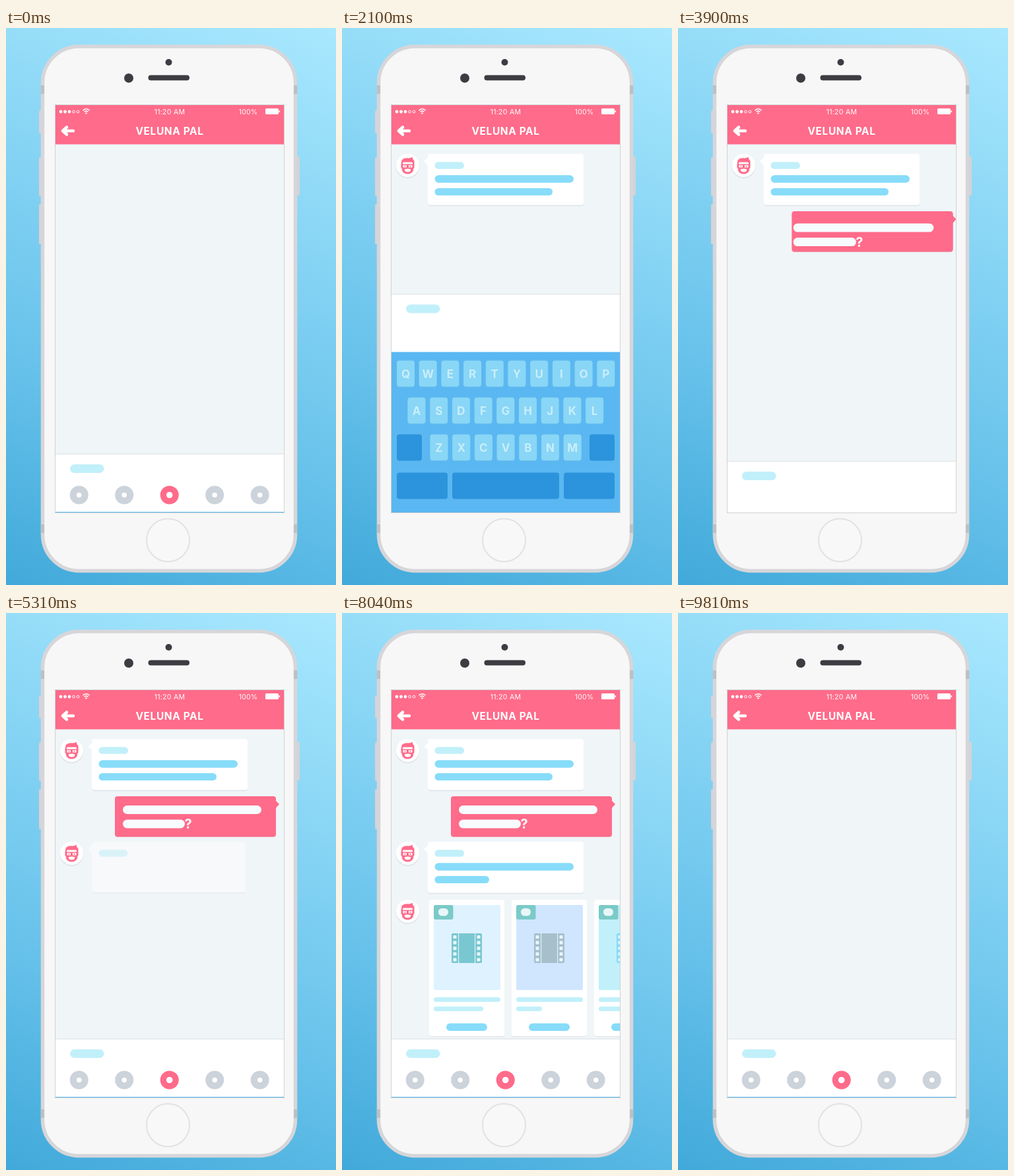
Animation, 500 px wide and 845 px high, one loop 9900 ms. Source, as an HTML page:

```html
<!DOCTYPE html>
<html lang="en">
<head>
<meta charset="utf-8">
<title>Chat assistant</title>
<style>
  html, body { margin: 0; width: 100%; height: 100%; overflow: hidden; }
  body { background: linear-gradient(202deg, #a9e8fe 0%, #7fd0f2 42%, #66c1ea 68%, #41a9da 100%); }
  svg { display: block; width: 500px; height: 845px; }
  text { font-family: Inter, Roboto, sans-serif; text-anchor: middle; }
</style>
</head>
<body>
<svg viewBox="0 0 500 845">
  <defs>
    <clipPath id="screen"><rect x="75" y="117" width="346" height="618"/></clipPath>
    <clipPath id="area"><rect x="75" y="176" width="346" height="559"/></clipPath>
    <g id="face">
      <circle cy="1.5" r="18" fill="#e0e6ea"/>
      <circle r="17.5" fill="#fff"/>
      <g fill="#ff6b8a">
        <path d="M-10 -1L-9 -8Q-5 -12 1 -11Q5 -11 7 -13Q7 -10 10 -7L10 -1H8L7 -5H-7L-8 -1Z"/>
        <path d="M-10 -2H10V4H9L8 9Q5 13 0 13Q-5 13 -8 9L-9 4H-10Z"/>
      </g>
      <path d="M-7 -4H7V-2.5H-7ZM-7 -.5H-1.5V3H-7ZM1.5 -.5H7V3H1.5ZM-5 6Q0 4 5 6L4 9Q0 11 -4 9Z" fill="#fff"/>
      <path d="M-5 .5H-3V2H-5ZM3 .5H5V2H3Z" fill="#ff6b8a"/>
    </g>
  </defs>

  <g fill="#d3d3d8">
    <rect x="50" y="125" width="8" height="35" rx="2"/>
    <rect x="50" y="196" width="8" height="59" rx="2"/>
    <rect x="50" y="267" width="8" height="61" rx="2"/>
    <rect x="437" y="195" width="8" height="59" rx="2"/>
  </g>
  <rect x="55.5" y="28" width="383" height="795.5" rx="55" fill="#f7f7f7" stroke="#d6d6da" stroke-width="5.5"/>
  <path d="M52.7 87H58V100H52.7ZM436 87H441.3V100H436ZM52.7 753H58V766H52.7ZM436 753H441.3V766H436Z" fill="#bfbfc3"/>
  <g fill="#3d3c43">
    <circle cx="246.5" cy="52" r="5"/>
    <circle cx="186" cy="76" r="7"/>
    <rect x="215.500" y="71.500" width="62.500" height="8" rx="4"/>
  </g>
  <circle cx="245.5" cy="777" r="32.5" fill="#f8f8f8" stroke="#e2e2e3" stroke-width="2"/>
  <rect x="74" y="116" width="348" height="620" fill="#cfd1d4"/>
  <rect x="75" y="117" width="346" height="618" fill="#f0f5f8"/>

  <g id="stage" clip-path="url(#area)"></g>

  <rect x="75" y="117" width="346" height="59.500" fill="#ff6b8a"/>
  <g fill="#fff">
    <circle cx="83" cy="127" r="2.400"/><circle cx="89.500" cy="127" r="2.400"/><circle cx="96" cy="127" r="2.400"/>
    <g fill="none" stroke="#fff">
      <circle cx="102.500" cy="127" r="1.900" stroke-width=".9"/><circle cx="109" cy="127" r="1.900" stroke-width=".9"/>
      <path d="M116.500 125Q121.500 120.500 126.500 125M118.500 127.200Q121.500 124.500 124.500 127.200" stroke-width="1.500"/>
      <path d="M102 156H86M92 150.500L86 156L92 161.500" stroke-width="4.600" stroke-linecap="round" stroke-linejoin="round"/>
    </g>
    <circle cx="121.500" cy="129.300" r="1.200"/>
    <text x="248" y="131" font-size="10.500" letter-spacing=".3">11:20 AM</text>
    <text x="367" y="131" font-size="10.500" letter-spacing=".2">100%</text>
    <rect x="393" y="122" width="20" height="9" rx="1.500"/>
    <rect x="413.500" y="125" width="1.500" height="3"/>
    <text x="248" y="162" font-size="15.500" font-weight="700" letter-spacing=".6">VELUNA PAL</text>
  </g>
</svg>
<script>
const LOOP = 9900;
const CYAN = '#87dcf9', PALE = '#c1f0fa', PINK = '#ff6b8a';
const stage = document.getElementById('stage');

// Element helpers
function set(el, attrs) {
  for (const k in attrs) el.setAttribute(k, attrs[k]);
  return el;
}
function add(parent, tag, attrs = {}) {
  return parent.appendChild(set(document.createElementNS('http://www.w3.org/2000/svg', tag), attrs));
}
const group = parent => add(parent, 'g');
const rect = (parent, x, y, width, height, fill, rx = 0) =>
  add(parent, 'rect', { x, y, width, height, fill, rx });
const pill = (parent, x, y, w, h, fill) => rect(parent, x, y - h / 2, w, h, fill, h / 2);
const label = (parent, x, y, text, size, fill) => {
  const el = add(parent, 'text', { x, y, fill, 'font-size': size, 'font-weight': 700 });
  el.textContent = text;
  return el;
};
const move = (el, x, y) => set(el, { transform: `translate(${x} ${y})` });
const fade = (el, v) => set(el, { opacity: v });

// Timing helpers
const ramp = (t, a, b) => Math.min(1, Math.max(0, (t - a) / (b - a)));
const mix = (a, b, p) => a + (b - a) * p;
const cubicOut = p => 1 - (1 - p) ** 3;
const inOut = p => p < .5 ? 4 * p ** 3 : 1 - 4 * (1 - p) ** 3;
const backOut = (p, s = 1.70158) => 1 + (s + 1) * (p - 1) ** 3 + s * (p - 1) ** 2;
const spring = p => p < 1 ? Math.exp(-5 * p) * Math.cos(17.6 * p) : 0;

const chat = group(stage);

// Avatar with typing dots
function makeTyper(start, y, cx) {
  const avatar = add(chat, 'use', { href: '#face' });
  const dots = [-1, 0, 1].map(() => add(chat, 'circle', { cy: y, fill: CYAN }));
  return t => {
    fade(avatar, ramp(t, start, start + 120));
    move(avatar, 99.5, y - 34 * spring(ramp(t, start, start + 800)));
    const env = ramp(t, start + 240, start + 380) * (1 - ramp(t, start + 690, start + 825));
    dots.forEach((dot, i) => set(dot, {
      cx: cx + (i - 1) * 18 * (.5 + .5 * env),
      r: 4.8 + 1.2 * Math.sin((t - start) / 75 - i * 1.4),
      opacity: env
    }));
  };
}

// White reply bubble whose lines are written in
function makeReply(start, top, width2) {
  const typer = makeTyper(start, top + 17.5, 248);
  const box = group(chat);
  rect(box, 130, top + 1.5, 236, 78, '#e1e8ec', 4);
  add(box, 'path', { d: `M131 ${top + 6}L124 ${top + 11}L131 ${top + 18}Z`, fill: '#fff' });
  rect(box, 130, top, 236, 77.5, '#fff', 4);
  pill(box, 140.5, top + 17.5, 44.5, 10.5, PALE);
  const lines = [pill(box, 140.5, top + 38, 0, 11.5, CYAN), pill(box, 140.5, top + 57.5, 0, 11, CYAN)];
  return t => {
    typer(t);
    const p = ramp(t, start + 810, start + 1000);
    const s = p ? backOut(p, 1) : 0;
    fade(box, p);
    set(box, { transform: `translate(125 ${top + 12}) scale(${s}) translate(-125 ${-top - 12})` });
    set(lines[0], { width: 210.5 * inOut(ramp(t, start + 1010, start + 1210)) });
    set(lines[1], { width: width2 * inOut(ramp(t, start + 1170, start + 1370)) });
  };
}

// Film strip icon centred on its own origin
function film(parent, color) {
  const g = group(parent);
  rect(g, -23, -22.5, 46, 45, color, 2);
  rect(g, -13, -22.5, 1.2, 45, '#d9f3fb');
  rect(g, 12, -22.5, 1.2, 45, '#d9f3fb');
  for (let i = 0; i < 5; i++)
    for (const x of [-20.5, 15.5]) rect(g, x, -19.5 + i * 8.6, 5, 5, '#e8f7fd', 1);
  return g;
}

const first = makeReply(60, 191, 178.5);
const second = makeReply(4410, 347, 82.5);
const third = makeTyper(6000, 452.5, 276);

// Outgoing message
const sent = group(chat);
rect(sent, 165, 279, 244, 61, '#ee9bad', 4);
add(sent, 'path', { d: 'M408 284L414 290L408 297Z', fill: PINK });
rect(sent, 165, 278, 244, 61, PINK, 4);

// Cards; the first one can open to fill the chat
function makeCard(parent, tint, icon, width2) {
  const parts = [
    [132, 436.5, 114, 207, '#e1e8ec', 4, 75, 177, 346, 470],
    [132, 435, 114, 207, '#fff', 4, 75, 177, 346, 470],
    [139, 443, 101, 129, tint, 2, 75, 177, 346, 300],
    [139, 443, 29.5, 22, '#7bcac8', 3, 89, 191, 60, 44],
    [146, 448, 15, 11.5, '#e8f6f8', 5.5, 103, 201, 32, 24],
    [139, 583, 101, 7, PALE, 3.5, 100, 502, 296, 15],
    [139, 597, width2, 7, PALE, 3.5, 100, 537, 220, 15],
    [158, 622.5, 62, 11.5, CYAN, 5.7, 181.5, 600.5, 133, 30]
  ].map(([x, y, w, h, fill, rx, ...to]) => ({ el: rect(parent, x, y, w, h, fill, rx), from: [x, y, w, h], to }));
  const strip = film(parent, icon);
  return (open, press) => {
    parts.forEach(({ el, from, to }, i) => {
      let [x, y, width, height] = from.map((v, k) => mix(v, to[k], open));
      if (i === 7) {
        const dx = width * press / 2, dy = height * press / 2;
        x -= dx; y -= dy; width += 2 * dx; height += 2 * dy;
        set(el, { rx: height / 2 });
      }
      set(el, { x, y, width, height });
    });
    set(strip, { transform: `translate(${mix(189, 248, open)} ${mix(508.5, 327, open)}) scale(${mix(1, 2.4, open)})` });
  };
}
const cards = [['#c1f0fa', '#87dcf9', 75], ['#d0e6ff', '#a7bfcb', 39], ['#dff2ff', '#79c7d0', 75]].map((look, k) => {
  const g = group(chat);
  return { g, order: 2 - k, shape: makeCard(g, ...look) };
});

// Input bar and keyboard share one vertical offset
const bar = group(stage);
rect(bar, 75, -1.5, 346, 2, '#e3e7ea');
rect(bar, 75, 0, 346, 400, '#fff');
pill(bar, 97, 21.5, 51.5, 13, PALE);
const tabs = group(bar);
for (let i = 0; i < 5; i++) {
  const cx = 110.7 + i * 68.5;
  add(tabs, 'circle', { cx, cy: 61.5, r: 14, fill: i === 2 ? PINK : '#ccd3da' });
  add(tabs, 'circle', { cx, cy: 61.5, r: i === 2 ? 4.8 : 3.8, fill: '#fff' });
}
const board = group(bar);
rect(board, 75, 87, 346, 300, '#5bb7f1');
const hot = {};
[['QWERTYUIOP', 83, 100], ['ASDFGHJKL', 99.5, 156], ['ZXCVBNM', 133.5, 212]].forEach(([row, x0, y]) => {
  [...row].forEach((ch, i) => {
    const x = x0 + i * 33.7;
    rect(board, x, y + 1, 27, 40, '#64bdec', 4);
    rect(board, x, y, 27, 39.5, '#89d6f6', 4);
    label(board, x + 13.5, y + 26, ch, 17, '#c9eefb');
    const g = hot[ch] = group(board);
    rect(g, x, y, 27, 39.5, '#04afff', 4);
    label(g, x + 13.5, y + 26, ch, 17, '#27d2f2');
  });
});
[[83, 212, 38], [375, 212, 38], [83, 270, 77], [167, 270, 162], [336, 270, 77]]
  .forEach(([x, y, w]) => rect(board, x, y, w, 40, '#2b94dc', 4));

const presses = ['WG', 'TN', 'AO', 'EV', 'IX', 'RK', 'JP', 'SC', 'UD', 'LB'];
function pressKeys(t) {
  for (const ch in hot) fade(hot[ch], 0);
  presses.forEach((pair, k) => {
    const age = t - 2430 - k * 90;
    if (age >= 0 && age < 180) for (const ch of pair) fade(hot[ch], 1 - age / 180);
  });
}

// Typed lines that later fly into the outgoing message
const typed = group(stage);
const rows = [pill(typed, 97, 458, 0, 13, CYAN), pill(typed, 97, 480, 0, 13, CYAN)];
const mark = label(typed, 0, 0, '?', 20, '#fff');
function drawTyped(t) {
  const p = cubicOut(ramp(t, 3510, 4073));
  const ink = Math.max(0, t - 2430) * .527;
  const w1 = Math.min(303, ink), w2 = Math.min(136, Math.max(0, ink - 303));
  const x = mix(97, 177, p), shift = -160 * p;
  const c = ramp(p, 0, .5);
  const fill = `rgb(${mix(135, 247, c)} ${mix(220, 251, c)} ${mix(249, 253, c)})`;
  const end = mix(w2, 94, p);
  set(rows[0], { x, y: 452 + shift, width: mix(w1, 210, p), fill });
  set(rows[1], { x, y: 473.5 + shift, width: end, fill });
  set(mark, { x: x + end + 5, y: 487 + shift, fill, opacity: ramp(t, 3270, 3300) });
  move(sent, 264 * (1 - p), 0);
  fade(sent, t >= 3510 ? 1 : 0);
}

function draw(t) {
  const out = 1 - ramp(t, 9600, 9810);
  fade(chat, out);
  fade(typed, out);
  first(t);
  second(t);
  third(t);

  const open = inOut(ramp(t, 8040, 8670));
  const press = .1 * Math.sin(Math.PI * ramp(t, 8820, 9360));
  cards.forEach(({ g, order, shape }) => {
    const start = 6840 + order * 130;
    const p = ramp(t, start, start + 730);
    fade(g, ramp(p, 0, .2));
    move(g, 125 * order + 100 * (1 - backOut(p)), 0);
    shape(order ? 0 : open, order ? 0 : press);
  });
  fade(typed, out * (1 - ramp(open, .3, .65)));

  const lift = t < 3000
    ? backOut(ramp(t, 1500, 2280), 1.19)
    : 1 - backOut(ramp(t, 3450, 4230), 1.19);
  move(bar, 0, 647 - 234 * lift);
  fade(bar, 1 - .25 * Math.sin(Math.PI * ramp(t, 9600, 9810)));
  const away = t < 3000
    ? ramp(t, 1500, 1700)
    : 1 - cubicOut(ramp(t, 3930, 4230));
  move(tabs, 0, 45 * away);
  fade(tabs, 1 - away);
  pressKeys(t);
  drawTyped(t);
}

function tick() {
  draw(performance.now() % LOOP);
  requestAnimationFrame(tick);
}
tick();
</script>
</body>
</html>
```
